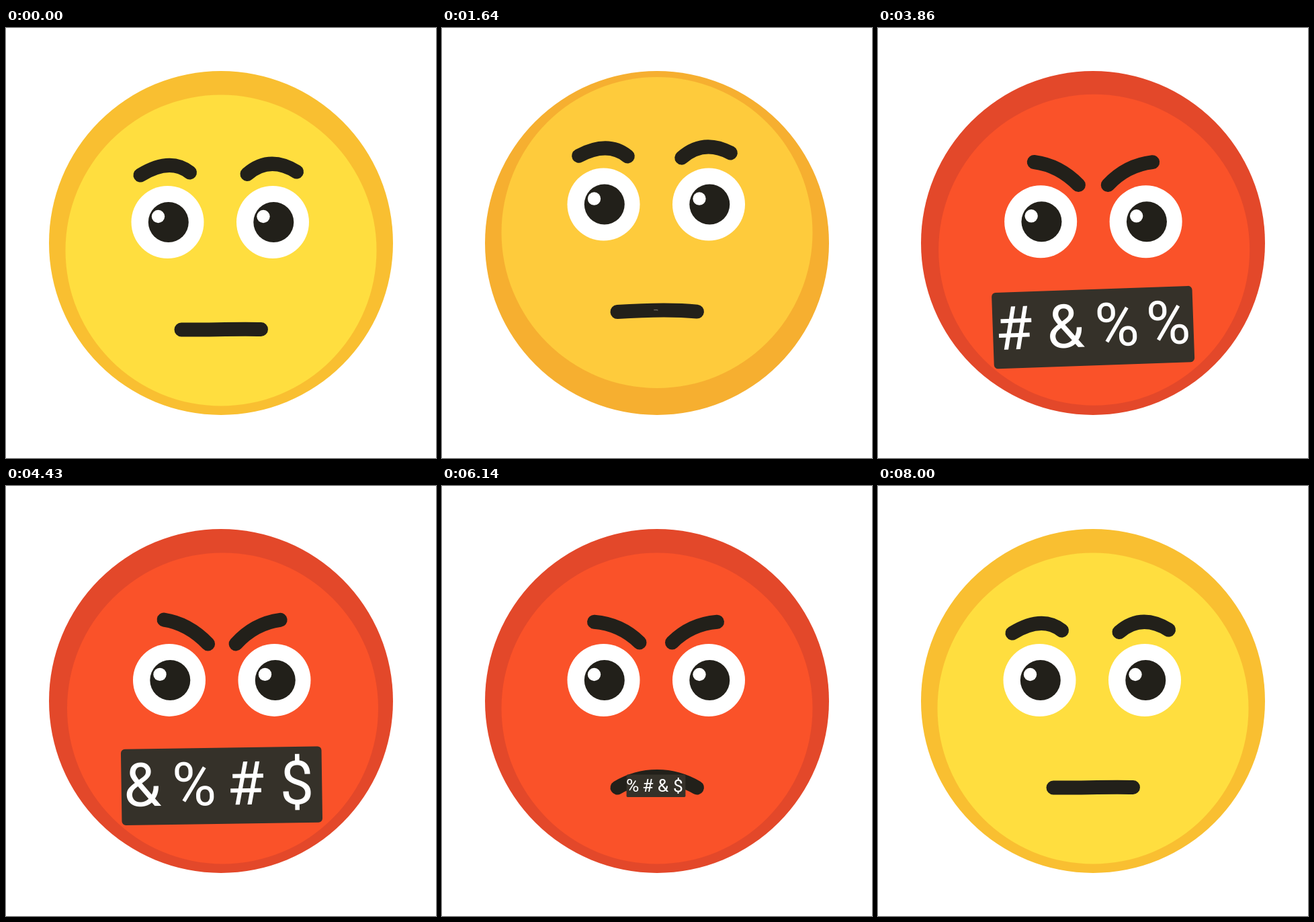
Write an HTML page with a canvas that moves like this. It is 640 by 640 pixels and loops after 8.07 s.

```html
<!DOCTYPE html>
<html lang="en">
<head>
<meta charset="utf-8">
<title>Angry face</title>
<style>
html, body { margin: 0; height: 100%; overflow: hidden; background: #fff; }
canvas { display: block; }
</style>
</head>
<body>
<canvas width="640" height="640"></canvas>
<script>
const ctx = document.querySelector('canvas').getContext('2d');
const LOOP = 8070, SHAKE_START = 2714, SHAKE_END = 5714, SHAKE_PERIOD = 500;
const INK = '#22201a';

const YELLOW = { rim: [249, 191, 49], skin: [255, 222, 63] };
const RED = { rim: [227, 72, 42], skin: [250, 82, 41] };

// Brows: start, control and end point; mouth: cubic curve
const LEFT_BROW = {
  calm: [200, 219, 244, 192, 273.5, 215],
  angry: [226.5, 202.3, 266, 205.5, 294, 233],
  tense: [6.4, -3.3, 3, -1, 4.3, 2.1]
};
const RIGHT_BROW = {
  calm: [359, 217.5, 392, 189, 432.5, 214],
  angry: [342.5, 233, 370, 205.5, 409.5, 202.3],
  tense: [-3, 2.1, -3, -1, -4, -3]
};
const MOUTH = {
  calm: [261, 449, 300, 449.5, 340, 447.5, 379.5, 448.5],
  angry: [261, 449, 298, 427, 342, 427, 379.5, 449]
};

const CURSES = ['%#&$', '&$#%', '%#$$', '$%&#', '#&%%', '$&$%', '&%#$'];
const SLOTS = [-118, -41, 35.5, 112];

const mix = (a, b, p) => a.map((v, i) => v + (b[i] - v) * p);

function ramp(t, from, to) {
  const u = Math.min(1, Math.max(0, (t - from) / (to - from)));
  return u * u * (3 - 2 * u);
}

function disc(x, y, r, fill) {
  ctx.fillStyle = fill;
  ctx.beginPath();
  ctx.arc(x, y, r, 0, Math.PI * 2);
  ctx.fill();
}

function curve(p) {
  ctx.beginPath();
  ctx.moveTo(p[0], p[1]);
  if (p.length === 6) ctx.quadraticCurveTo(...p.slice(2));
  else ctx.bezierCurveTo(...p.slice(2));
  ctx.stroke();
}

function brow(pose, anger, tension) {
  curve(mix(pose.calm, pose.angry, anger).map((v, i) => v + pose.tense[i] * tension));
}

function eye(x) {
  disc(x, 289, 54, '#fff');
  disc(x + 1.3, 289, 30, INK);
  disc(x - 14, 280.5, 9.7, '#fff');
}

function censorBar(t, scale, angle) {
  if (scale <= 0) return;
  ctx.save();
  ctx.translate(318.5, 446.3);
  ctx.rotate(angle);
  ctx.scale(scale, scale);
  ctx.fillStyle = '#353129';
  ctx.beginPath();
  ctx.roundRect(-149.3, -56.7, 298.6, 113.4, 6);
  ctx.fill();
  ctx.fillStyle = '#fff';
  ctx.font = '90px Roboto, sans-serif';
  ctx.textAlign = 'center';
  const curse = CURSES[Math.floor(t / 214) % CURSES.length];
  SLOTS.forEach((x, i) => ctx.fillText(curse[i], x, 28.5));
  ctx.restore();
}

function draw(t) {
  const fury = ramp(t, 1270, 2870);
  const flush = fury - ramp(t, 6140, 7714);
  const anger = fury - ramp(t, 6140, 7980);
  const frown = fury - ramp(t, 6140, 7714);
  const barScale = ramp(t, 1510, 3010) - ramp(t, 5500, 6500);

  const shaking = t >= SHAKE_START && t < SHAKE_END;
  const phase = shaking ? (t - SHAKE_START) / SHAKE_PERIOD * Math.PI * 2 : 0;
  const sway = (1 - Math.cos(phase)) / 2;
  const dy = -28 * ramp(t, 0, 900) + 26 * ramp(t, 1493, 2500)
    + 2 * sway + 2 * ramp(t, SHAKE_END, 6000);

  const tint = part => `rgb(${mix(YELLOW[part], RED[part], flush)})`;

  ctx.fillStyle = '#fff';
  ctx.fillRect(0, 0, 640, 640);
  disc(320, 320, 256, tint('rim'));

  ctx.save();
  ctx.translate(2.6 * sway, dy);
  disc(320, 331, 231.5, tint('skin'));
  eye(240.5);
  eye(397);
  ctx.strokeStyle = INK;
  ctx.lineWidth = 21;
  ctx.lineCap = 'round';
  brow(LEFT_BROW, anger, sway);
  brow(RIGHT_BROW, anger, sway);
  curve(mix(MOUTH.calm, MOUTH.angry, frown));
  censorBar(t, barScale, -0.0365 * Math.sin(phase));
  ctx.restore();
}

const start = performance.now();
function tick() {
  draw((performance.now() - start) % LOOP);
  requestAnimationFrame(tick);
}
tick();
</script>
</body>
</html>
```
